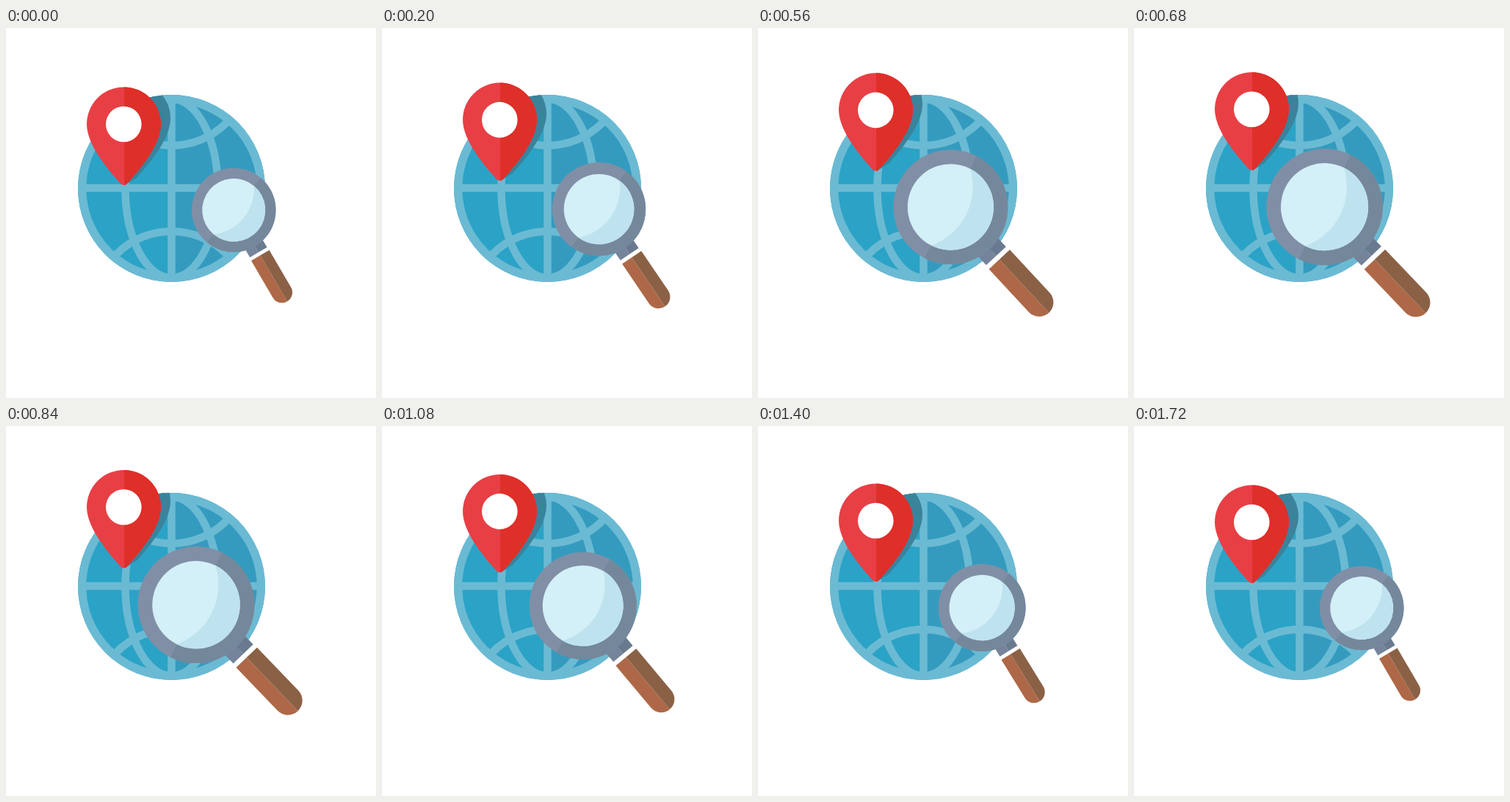
An HTML page for the animation above (1.8 s loop, 504 px wide and 504 px high).

```html
<!DOCTYPE html>
<html lang="en">
<head>
<meta charset="utf-8">
<title>Globe search</title>
<style>
  html, body { margin: 0; height: 100%; overflow: hidden; background: #fff; }
  svg { display: block; width: 100%; height: 100%; }
</style>
</head>
<body>
<svg viewBox="0 0 504 504">
  <defs>
    <path id="pinShape" d="M110 131a50.5 50.5 0 0 1 101 0C211 160 180 195 165 212Q160.500 216 156 212C141 195 110 160 110 131Z"/>
    <clipPath id="globeClip"><circle cx="225.500" cy="218.500" r="127.500"/></clipPath>
    <clipPath id="pinRight"><path d="M161 70h60v160h-60z"/></clipPath>
  </defs>

  <g clip-path="url(#globeClip)">
    <path fill="#2ba3c6" d="M90 80h136v280h-136z"/>
    <path fill="#349bbf" d="M225.500 80h140v280h-140z"/>
    <g fill="none" stroke="#6bbad3" stroke-width="10.500">
      <circle cx="225.500" cy="218.500" r="122" stroke-width="11.500"/>
      <path d="M225.500 95v247M102 218h247"/>
      <ellipse cx="225.500" cy="218.500" rx="63" ry="122"/>
      <circle cx="225.500" cy="383" r="106"/>
      <circle cx="225.500" cy="54" r="106"/>
    </g>
    <g class="bob" fill="#3b829b">
      <use href="#pinShape" x="4" y="-2.500"/>
      <use href="#pinShape" x="8" y="-5"/>
      <use href="#pinShape" x="13" y="-8"/>
    </g>
  </g>

  <g class="bob">
    <use href="#pinShape" fill="#e83f45"/>
    <use href="#pinShape" fill="#de2f29" clip-path="url(#pinRight)"/>
    <circle cx="160.300" cy="131" r="24.300" fill="#fff"/>
  </g>

  <!-- The lens centre is the origin and the handle points along +x. -->
  <g id="magnifier">
    <path fill="#75839b" d="M50 0H66.700V13.500H50z"/>
    <path fill="#697a90" d="M50 -13.500H66.700V0H50z"/>
    <path fill="#ae6847" d="M71.500 0V14.200H130A14.200 14.200 0 0 0 144.200 0z"/>
    <path fill="#8b6146" d="M71.500 0V-14.200H130A14.200 14.200 0 0 1 144.200 0z"/>
    <g transform="rotate(70)">
      <circle r="57.250" fill="#808fa6"/>
      <path fill="#75889b" d="M-57.250 0A57.250 57.250 0 0 1 57.250 0z"/>
      <circle r="43" fill="#d3eff7"/>
      <path fill="#bee3ee" d="M-43 0A43 43 0 0 1 43 0A62 62 0 0 0 -43 0z"/>
    </g>
  </g>
</svg>
<script>
  const LOOP = 1800, TICK = 40, HALF = 21;
  const bobbers = document.querySelectorAll('.bob');
  const magnifier = document.getElementById('magnifier');
  const mix = (from, to, p) => from + (to - from) * p;

  // Cosine easing with a quick start and a long settle.
  const ease = u => (1 - Math.cos(Math.PI * (1 - (1 - u) ** 1.64))) / 2;

  // Zoom in, rest one tick, zoom out, rest one tick.
  function progress(ms) {
    const tick = Math.floor((ms % LOOP) / TICK);
    return tick <= HALF
      ? ease(tick / HALF)
      : 1 - ease(Math.min(1, (tick - HALF - 1) / HALF));
  }

  function draw(now) {
    const p = progress(now);
    bobbers.forEach(el => el.setAttribute('transform', `translate(0 ${-20.5 * p})`));
    magnifier.setAttribute('transform',
      `translate(${mix(310.25, 259, p)} ${mix(248, 243.6, p)}) ` +
      `rotate(${mix(59.7, 46.2, p)}) scale(${mix(1, 1.389, p)})`);
  }

  const start = performance.now();
  function frame() {
    draw(performance.now() - start);
    requestAnimationFrame(frame);
  }
  frame();
</script>
</body>
</html>
```
